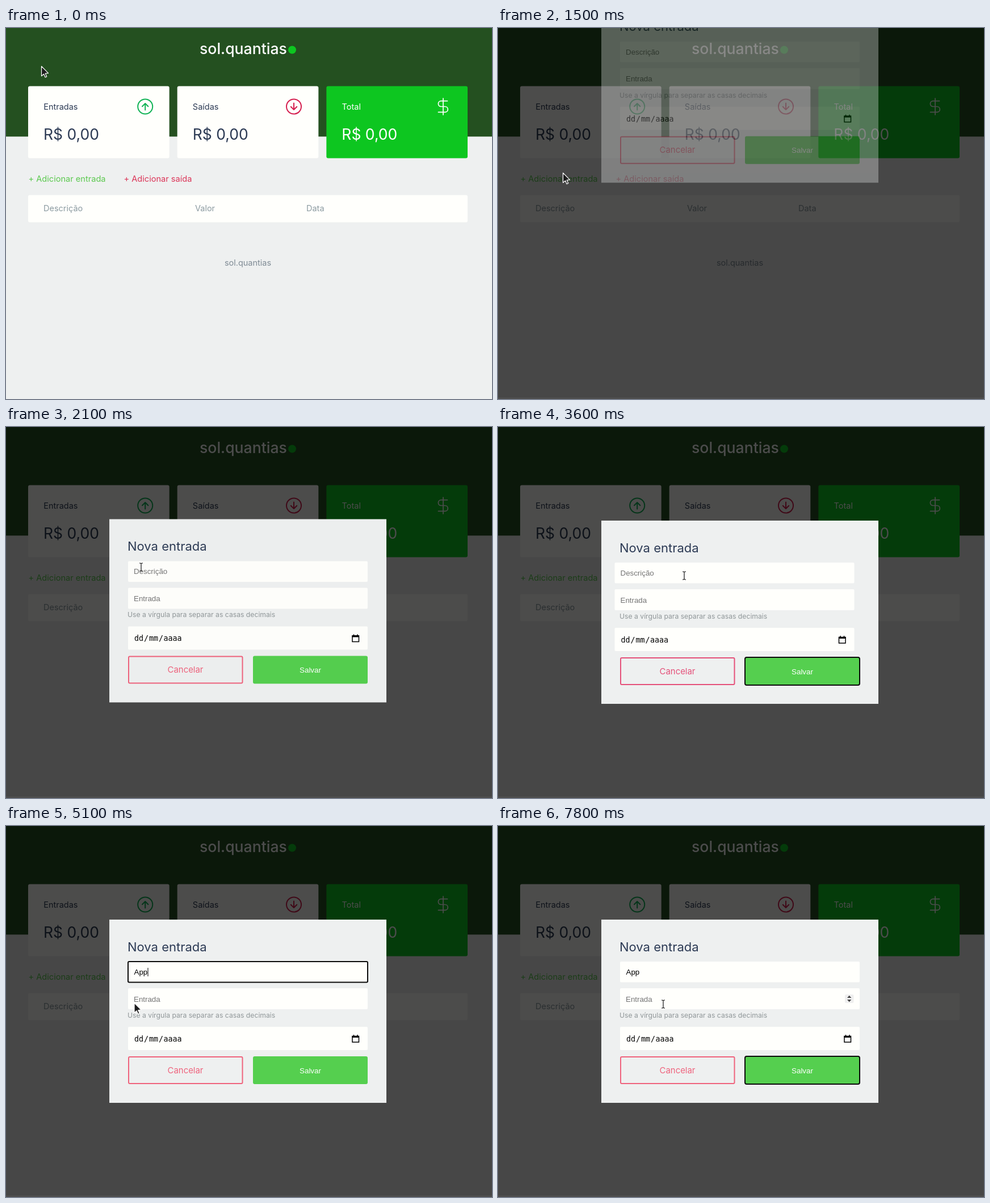
These frames come from a looping animation (856 px wide and 654 px high, 8 s). An HTML page:

```html
<!DOCTYPE html>
<html lang="pt-BR">
<head>
<meta charset="utf-8">
<title>Controle de gastos</title>
<style>
  html, body { margin: 0; width: 100%; height: 100%; overflow: hidden; background: #eef0f0; }
  svg { display: block; width: 856px; height: 654px; }
  text { font: 14.5px Inter, sans-serif; white-space: pre; }
  .ink { fill: #2d3b55; }
  .white { fill: #fff; }
  .paper { fill: #fffffc; }
  .muted { fill: #8c9ba1; }
  .mid { text-anchor: middle; }
  .brand { font-size: 26.6px; font-weight: 500; fill: #fff; }
  .money { font-size: 26.5px; }
  .link { font-size: 14.6px; }
  .title { font-size: 22px; }
  .help { font-size: 12.2px; fill: #909799; }
  .field { font: 13.333px "Liberation Sans", Arial, sans-serif; fill: #757575; }
  .typed { fill: #000; }
  .date { font: 13.333px "DejaVu Sans Mono", monospace; fill: #000; }
  .option { font: 500 15.5px "Noto Sans", sans-serif; fill: #eceded; }
  .line { fill: none; stroke-width: 2; stroke-linecap: round; stroke-linejoin: round; }
  .focus { fill: none; stroke: #0b0b0b; stroke-width: 2; }
  #cancel rect { fill: none; stroke: currentColor; stroke-width: 2; }
  #cancel text { font-size: 14.9px; fill: currentColor; }
</style>
</head>
<body>
<svg viewBox="0 0 856 654">
  <rect width="856" height="654" fill="#eef0f0"/>
  <rect width="856" height="191.4" fill="#245020"/>
  <text class="brand" x="341" y="46">sol.quantias</text>
  <circle cx="504" cy="38.5" r="7" fill="#0dc620"/>

  <g id="cards"></g>
  <g class="line" stroke="#12b356">
    <circle cx="245.2" cy="138.5" r="13"/>
    <path d="M245.2 144.5V133M240 138.2l5.2-5.2 5.2 5.2"/>
  </g>
  <g class="line" stroke="#d51f4f">
    <circle cx="507" cy="138.5" r="13"/>
    <path d="M507 132.5V144M501.8 138.8l5.2 5.2 5.2-5.2"/>
  </g>
  <path class="line" stroke="#fff" style="stroke-width:1.7"
    d="M770 124V153M777.5 128.7H766.3a4.9 4.9 0 0 0 0 9.8H773.3a4.9 4.9 0 0 1 0 9.9H761.5"/>

  <text class="link" x="39.5" y="271" fill="#5bc94f">+ Adicionar entrada</text>
  <text class="link" x="207.5" y="271" fill="#dc3558">+ Adicionar saída</text>
  <rect class="paper" x="39" y="294.6" width="774" height="48" rx="3"/>
  <text class="muted" x="66" y="323">Descrição</text>
  <text class="muted" x="333" y="323">Valor</text>
  <text class="muted" x="529" y="323">Data</text>
  <text class="mid" x="426" y="418.5" fill="#7f8b95">sol.quantias</text>

  <g id="overlay">
    <rect width="856" height="654" fill="#000" opacity=".7"/>
    <rect y="651" width="856" height="3" fill="#fff" opacity=".04"/>
  </g>

  <g id="modal">
    <rect x="182" y="165" width="488" height="323" fill="#eef0f0"/>
    <text class="title ink" x="214" y="220.5">Nova entrada</text>
    <text class="help" x="214" y="338">Use a vírgula para separar as casas decimais</text>

    <g id="inputs">
      <rect class="paper" x="215" y="239" width="422" height="36.5" rx="2"/>
      <rect class="paper" x="215" y="286" width="422" height="37" rx="2"/>
      <rect class="paper" x="215" y="354" width="422" height="41" rx="2"/>
      <text id="hint" class="field" x="225" y="262">Descrição</text>
      <text id="typed" class="field typed" x="225.5" y="262">App</text>
      <text class="field" x="225" y="309.5">Entrada</text>
      <g id="spinner">
        <rect x="611" y="297" width="15.5" height="15" rx="2" fill="#efefef"/>
        <path d="M615 303l3.7-4.2 3.7 4.2zM615 306l3.7 4.2 3.7-4.2z" fill="#444"/>
      </g>
      <rect id="picked" x="226" y="367" width="17" height="17" fill="#a9d2f4"/>
      <text class="date" y="380"><tspan x="226">dd</tspan><tspan x="243">/</tspan><tspan x="252">mm</tspan><tspan x="269">/</tspan><tspan x="277.5">aaaa</tspan></text>
      <path d="M610 370.5h11.5V381H610zM612.5 368v2M619 368v2" fill="none" stroke="#000" stroke-width="1.5"/>
      <path d="M609.5 370h12.5v3h-12.5z"/>
    </g>

    <g id="cancel">
      <rect x="216" y="407" width="200.5" height="47" rx="2"/>
      <text class="mid" x="316" y="435.5">Cancelar</text>
    </g>
    <rect id="save" x="435" y="406" width="202" height="49" rx="3"/>
    <text class="field mid" x="536" y="435.5" style="fill:#fff">Salvar</text>

    <rect id="focusText" class="focus" x="215" y="239" width="422" height="36.5" rx="2"/>
    <rect id="focusDate" class="focus" x="215" y="354" width="422" height="41" rx="2"/>
    <rect id="focusSave" class="focus" x="435" y="406" width="202" height="49" rx="3"/>
    <rect id="caretStart" x="226" y="250" width="1" height="15"/>
    <rect id="caretEnd" x="249.5" y="250" width="1" height="15"/>
  </g>

  <g id="list">
    <rect x="206" y="278" width="426" height="227" rx="3" opacity=".25"/>
    <rect x="207" y="277" width="424" height="226.5" rx="2" fill="#27282b"/>
    <rect id="hover" x="207" y="285" width="424" height="35" fill="#3f4145"/>
  </g>

  <path id="arrow" d="M0 0V17.2L4 13.6 6.6 19.4 9.2 18.2 6.7 12.6 12 12.2Z"
    fill="#1c1c1c" stroke="#fff" stroke-width="1.2" stroke-linejoin="round"/>
  <g id="beam" fill="none">
    <path d="M-3-7H-1.3L0-6 1.3-7H3M0-6V6M-3 7H-1.3L0 6 1.3 7H3" stroke="#fff" stroke-width="2.6" opacity=".7"/>
    <path d="M-3-7H-1.3L0-6 1.3-7H3M0-6V6M-3 7H-1.3L0 6 1.3 7H3" stroke="#111" stroke-width="1.2"/>
  </g>
</svg>

<script>
const LOOP = 8000, STEP = 100;
const $ = id => document.getElementById(id);

const GAP = 14, CARD = (774 - 2 * GAP) / 3;
const cards = [
  ['Entradas', 'paper', 'ink'],
  ['Saídas', 'paper', 'ink'],
  ['Total', 'total', 'white'],
];
$('cards').innerHTML = cards.map(([name, face, ink], i) => {
  const x = 39 + i * (CARD + GAP);
  return `
    <rect class="${face}" x="${x}" y="102.5" width="${CARD}" height="127" rx="3" fill="#0dc620"/>
    <text class="${ink}" x="${x + 27.2}" y="143.5">${name}</text>
    <text class="money ${ink}" x="${x + 27}" y="197">R$ 0,00</text>`;
}).join('');

const options = ['App', 'a', 'Gás', 'ULFE', 'a'.repeat(13), 'a'.repeat(6)];
$('list').insertAdjacentHTML('beforeend', options.map((word, i) =>
  `<text class="option" x="217" y="${308 + i * 35.2}">${word}</text>`).join(''));

// id, then pairs of start and end times
const visible = [
  ['overlay', 1300, LOOP],
  ['modal', 1300, LOOP],
  ['hint', 0, 4800],
  ['typed', 4800, LOOP],
  ['spinner', 5300, 5600, 7600, LOOP],
  ['picked', 5900, 6700],
  ['focusText', 3700, 5900],
  ['focusDate', 5900, 6700],
  ['focusSave', 3000, 3700, 6700, LOOP],
  ['caretStart', 3900, 4500],
  ['caretEnd', 5100, 5500],
  ['list', 3700, 5100],
  ['hover', 4800, 5100],
];

// time, x, y
const path = [
  [400, 62.5, 67.5], [1200, 114.5, 255.5], [1500, 114.5, 255.5], [2100, 238, 247],
  [2200, 242, 250], [2800, 500, 428], [3100, 500, 428], [3300, 385, 420],
  [3500, 328, 262], [4600, 328, 262], [4900, 226, 312], [5200, 226, 312],
  [5300, 228, 300], [5400, 228, 300], [5800, 420, 372], [6200, 487, 402],
  [6300, 487, 403], [6700, 500, 428], [7000, 500, 428], [7400, 345, 425],
  [7600, 290, 316], [7700, 290, 316], [7800, 291, 314],
];

function pointerAt(t) {
  const i = path.findIndex(p => p[0] > t);
  if (i === 0) return path[0].slice(1);
  if (i < 0) return path[path.length - 1].slice(1);
  const [t0, x0, y0] = path[i - 1], [t1, x1, y1] = path[i];
  const u = (t - t0) / (t1 - t0), k = u * u * (3 - 2 * u);
  return [x0 + (x1 - x0) * k, y0 + (y1 - y0) * k];
}

// CSS "ease": cubic-bezier(.25, .1, .25, 1)
function ease(x) {
  if (x <= 0) return 0;
  if (x >= 1) return 1;
  const curve = (s, a, b) => 3 * a * s * (1 - s) ** 2 + 3 * b * s * s * (1 - s) + s ** 3;
  let lo = 0, hi = 1;
  for (let i = 0; i < 24; i++) {
    const s = (lo + hi) / 2;
    if (curve(s, .25, .25) < x) lo = s; else hi = s;
  }
  return curve(lo, .1, 1);
}

const inside = (x, y, x0, y0, x1, y1) => x >= x0 && x <= x1 && y >= y0 && y <= y1;
const show = (id, on) => { $(id).style.display = on ? '' : 'none'; };
const move = (id, x, y) => $(id).setAttribute('transform', `translate(${x} ${y})`);

function draw(t) {
  for (const [id, ...spans] of visible)
    show(id, spans.some((s, i) => i % 2 === 0 && t >= s && t < spans[i + 1]));

  const p = ease((t - 1305) / 900);
  move('modal', 0, -323 * (1 - p));
  $('modal').setAttribute('opacity', p);

  const shaking = t >= 3000 && t < 3700;
  move('inputs', shaking ? 4.75 * (Math.cos((t - 3000) / 200 * Math.PI) - 1) : 0, 0);

  const [x, y] = pointerAt(t);
  const listed = t >= 3700 && t < 5300;
  const settled = t >= 1900;
  const overText = settled && (inside(x, y, 215, 239, 637, 276) ||
    !listed && inside(x, y, 215, 286, 637, 323));
  const overCancel = settled && inside(x, y, 215, 406, 417, 455);
  const overSave = settled && inside(x, y, 435, 406, 637, 455);
  $('cancel').style.color = overCancel ? '#e5305a' : shaking ? '#e5517a' : '#ef637d';
  $('save').setAttribute('fill', overSave ? '#2ec626' : '#55cf4f');
  show('arrow', !overText);
  show('beam', overText);
  move(overText ? 'beam' : 'arrow', x, y);
}

const start = performance.now();
function tick() {
  const t = (performance.now() - start) % LOOP;
  draw(Math.floor(t / STEP) * STEP);
  requestAnimationFrame(tick);
}
tick();
</script>
</body>
</html>
```
